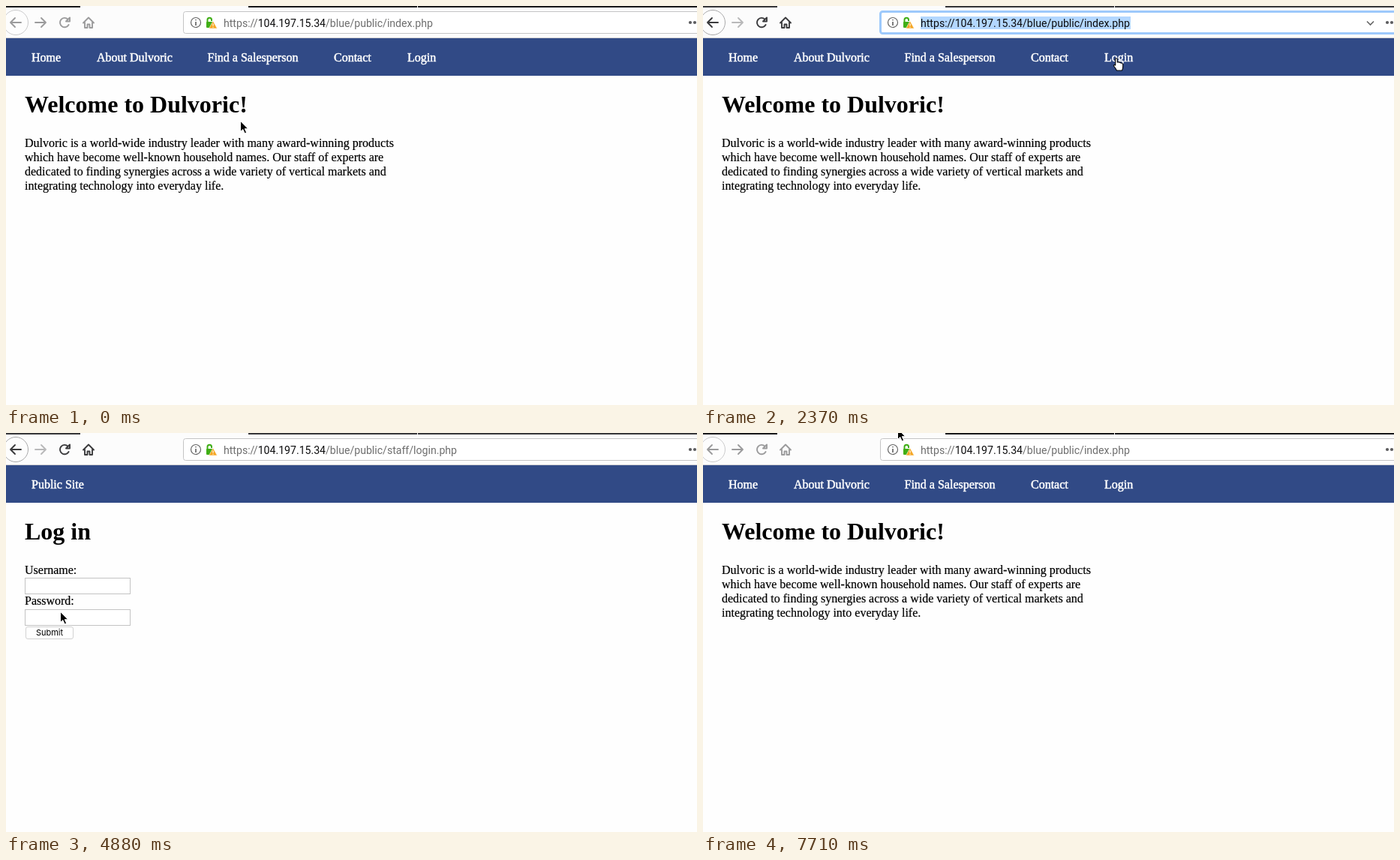
Write an HTML page that moves like this. It is 921 px wide and 532 px high and loops after 8 s.

```html
<!DOCTYPE html>
<html lang="en">
<head>
<meta charset="utf-8">
<title>Login walk-through</title>
<style>
html, body { margin: 0; width: 100%; height: 100%; overflow: hidden; background: #fefefe; }
svg { display: block; font: 16px "Liberation Serif", Times, serif; }
.page { stroke: #000; stroke-width: .2px; }
.nav { fill: #fff; stroke: #fff; stroke-width: .5px; }
.title { font-size: 32px; font-weight: bold; stroke: none; }
.icon { fill: none; stroke-width: 1.9; stroke-linejoin: round; stroke-linecap: round; }
.field { fill: #fff; stroke: #c3c3c3; }
#address { font: 14.1px Roboto, Inter, sans-serif; }
#submit { font: 11px Inter, Roboto, sans-serif; stroke: none; }
</style>
</head>
<body>
<svg width="921" height="532" viewBox="0 0 921 532">
  <rect width="921" height="532" fill="#fefefe"/>
  <rect width="921" height="42" fill="#fcfcfc"/>
  <path d="M0 42.5H921" stroke="#cfcfd1"/>
  <path id="tabs" d="M0 0H99V2H0ZM323 0H548V2H323ZM549 0H921V2H549Z"/>
  <rect id="burst" x="99" width="130" height="2" fill="#c4e3fb"/>

  <circle id="ring" cx="13" cy="22" r="16.5" fill="#fdfdfd"/>
  <g class="icon">
    <path id="back" d="M20 22H6M12 16L6 22L12 28"/>
    <path id="forward" d="M39 22H53M47 16L53 22L47 28"/>
    <path id="reload" d="M82.5 17.6A6.2 6.2 0 1 0 83.6 25M85 15.5V20.5H80Z"/>
    <path id="home" d="M103 22.5L110 15.5L117 22.5M105 21.5V29H108.5V24.5H111.5V29H115V21.5"/>
  </g>
  <rect id="url" x="236.5" y="7.5" width="700" height="29" rx="3" fill="#fff"/>
  <g fill="none" stroke="#666" stroke-width="1.2">
    <circle cx="253" cy="22" r="6.5"/>
    <path d="M253 21V26M253 18V19.3" stroke-width="1.7"/>
    <path id="chevron" d="M885 20.5L889.5 25L894 20.5" stroke-width="1.6"/>
  </g>
  <path d="M268.5 22V18.5A2.7 2.7 0 0 1 274 18.5V20" fill="none" stroke="#3fae15" stroke-width="2"/>
  <rect x="267" y="21" width="9" height="8" rx="1" fill="#3fae15"/>
  <path d="M276 20L281.5 30H270.5Z" fill="#f5a623" stroke="#fff" stroke-width=".6"/>
  <path d="M276 23.5V26.5M276 27.7V28.8" stroke="#fff" stroke-width="1.2"/>
  <g fill="#5c5c5e"><circle cx="912" cy="22" r="2.1"/><circle cx="918" cy="22" r="2.1"/></g>
  <rect id="selection" x="290" y="14" width="280" height="17" fill="#b3d7ff"/>
  <text id="address" x="290" y="28">https://<tspan fill="#0c0c0d">104.197.15.34</tspan>/blue/public/<tspan id="file"></tspan></text>

  <rect y="43" width="921" height="50" fill="#314a86"/>
  <g id="welcome" class="page">
    <g class="nav">
      <text x="34" y="74">Home</text>
      <text x="121" y="74">About Dulvoric</text>
      <text x="268.5" y="74">Find a Salesperson</text>
      <text x="437" y="74">Contact</text>
      <text x="535" y="74">Login</text>
    </g>
    <text class="title" x="25" y="142">Welcome to Dulvoric!</text>
    <text x="25" y="188">Dulvoric is a world-wide industry leader with many award-winning products</text>
    <text x="25" y="207">which have become well-known household names. Our staff of experts are</text>
    <text x="25" y="226">dedicated to finding synergies across a wide variety of vertical markets and</text>
    <text x="25" y="245">integrating technology into everyday life.</text>
  </g>
  <g id="login" class="page">
    <text class="nav" x="34" y="74">Public Site</text>
    <text class="title" x="25" y="142">Log in</text>
    <text x="25" y="188">Username:</text>
    <text x="25" y="229">Password:</text>
    <g stroke-width="1" style="stroke-width:1px">
      <rect class="field" x="25.5" y="193.5" width="140" height="21"/>
      <rect class="field" x="25.5" y="235.5" width="140" height="21"/>
      <rect class="field" x="26.5" y="258.5" width="63" height="16" rx="2.5" style="stroke:#d2d2d2"/>
    </g>
    <text id="submit" x="58" y="270" text-anchor="middle">Submit</text>
  </g>

  <g id="cursor" stroke-linejoin="round">
    <path id="arrow" d="M.5 .3V14.5L3.8 11.5L6.2 16.8L8.6 15.7L6.3 10.7H10.6Z" fill="#000" stroke="#fff"/>
    <path id="hand" d="M-1.3 9V1A1.3 1.3 0 0 1 1.3 1V5Q5 4.5 5.8 6Q8.7 6 8.7 8V11Q8.7 14 7.3 16H.4Q-.6 13.5 -3.5 10Q-4.2 8 -1.3 9Z" fill="#fff" stroke="#000" stroke-width="1.1"/>
  </g>
</svg>
<script>
const LOOP = 8000, STEP = 148, LEAD = 8;
const HOME = { x: 312, y: 153 };
// Each glide eases the pointer to a new spot between two times
const glides = [
  { from: 0, to: 436, x: 411, y: 134 },
  { from: 584, to: 880, x: 492, y: 108 },
  { from: 1030, to: 1620, x: 541, y: 58 },
  { from: 1620, to: 2360, x: 551, y: 70 },
  { from: 2510, to: 2950, x: 550, y: 68 },
  { from: 3396, to: 3690, x: 170, y: 83 },
  { from: 3690, to: 4136, x: 80, y: 66 },
  { from: 4290, to: 4876, x: 72, y: 238 },
  { from: 4876, to: 5024, x: 57, y: 262 },
  { from: 5024, to: 5468, x: 80, y: 43 },
  { from: 5468, to: 5764, x: 91, y: 60 },
  { from: 6060, to: 6652, x: 95, y: 76 },
  { from: 6652, to: 7096, x: 222, y: 18 },
  { from: 7096, to: 7688, x: 259, y: -6 }
];
const el = id => document.getElementById(id);
const show = (id, on) => el(id).setAttribute("visibility", on ? "visible" : "hidden");
const paint = (id, attrs) => {
  for (const name in attrs) el(id).setAttribute(name, attrs[name]);
};
const smooth = p => p * p * (3 - 2 * p);

function pointer(t) {
  let { x, y } = HOME;
  for (const g of glides) {
    const p = smooth(Math.min(1, Math.max(0, (t - g.from) / (g.to - g.from))));
    x += (g.x - x) * p;
    y += (g.y - y) * p;
  }
  return [Math.round(x), Math.round(y)];
}

function draw(t) {
  const during = (from, to) => t >= from && t < to;
  const active = during(1754, 7400);
  const selected = during(1754, 2650);
  const login = during(3100, 6500);
  const hand = during(1900, 3100) || during(4130, 4430) || during(5610, 6500);
  const ink = active ? "#3b3b3d" : "#9b9b9c";
  const reloadInk = during(3100, 3830) ? "#d2d2d3" : ink;

  paint("tabs", { fill: active ? "#38383b" : "#1b1b1d" });
  paint("ring", { stroke: active ? "#a9a9aa" : "#cbcbcc" });
  paint("back", { stroke: ink });
  paint("home", { stroke: ink });
  paint("forward", { stroke: active ? "#b9b9ba" : "#9b9b9c" });
  paint("reload", { stroke: reloadInk });
  paint("url", { stroke: selected ? "#9dc9fb" : "#c4c4c5", "stroke-width": selected ? 3 : 1 });
  paint("address", { fill: selected ? "#0c0c0d" : "#6e6e6e" });
  el("file").textContent = login ? "staff/login.php" : "index.php";

  show("selection", selected);
  show("chevron", selected);
  show("burst", during(3100, 3240) || during(6640, 6790));
  show("welcome", !login);
  show("login", login);
  show("hand", hand);
  show("arrow", !hand);
  paint("cursor", { transform: `translate(${pointer(t)})` });
}

function tick() {
  const t = performance.now() % LOOP;
  draw(Math.floor((t + LEAD) / STEP) * STEP - LEAD);
  requestAnimationFrame(tick);
}
tick();
</script>
</body>
</html>
```
